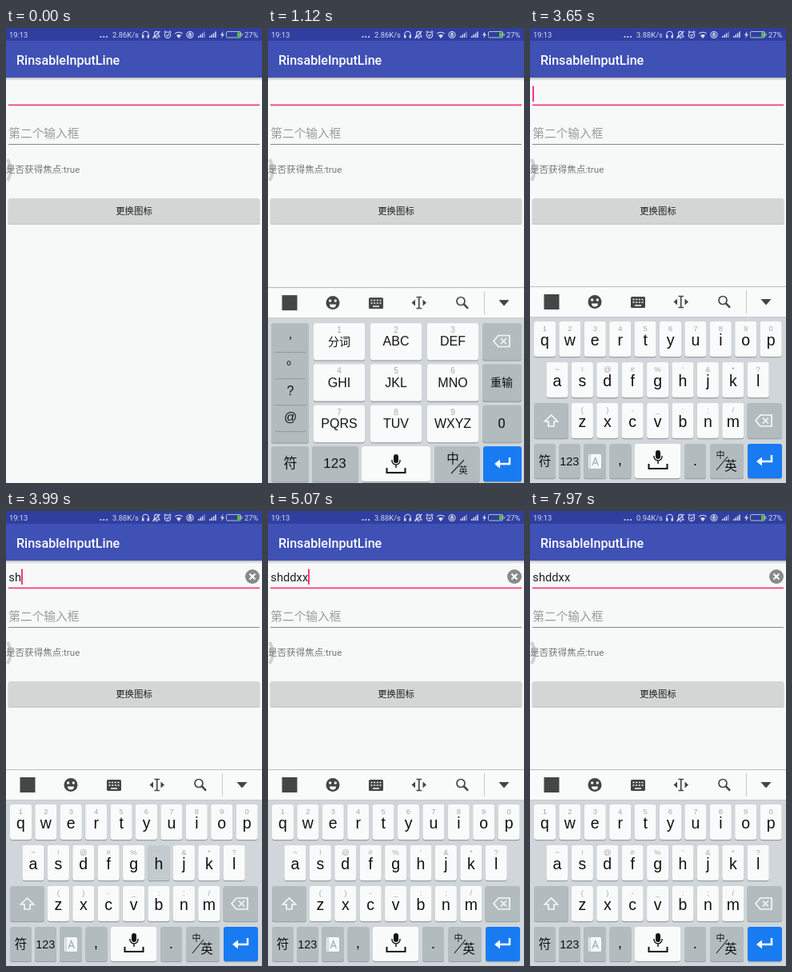
These frames come from a looping animation (320x569 px, 8 s). An HTML page:

```html
<!DOCTYPE html>
<html lang="zh-CN">
<head>
<meta charset="utf-8">
<title>Input demo</title>
<style>
html, body { margin: 0; width: 100%; height: 100%; overflow: hidden; background: #f7f9f8; }
svg { display: block; width: 100%; height: 100%; }
text { font-family: Roboto, "Noto Sans CJK SC", "Noto Sans CJK", sans-serif; white-space: pre; }
.key { font-family: "Liberation Sans", "Noto Sans CJK SC", "Noto Sans CJK", sans-serif; text-anchor: middle; fill: #111; }
.hint { fill: #a3a8a8; }
.word { font-weight: 500; }
.slim { font-family: Roboto, sans-serif; }
.status { font-size: 9.4px; fill: #d5daf1; }
.line { fill: none; stroke: #d5daf1; stroke-width: 1.1; }
.anim, .anim * { animation-duration: 8s; animation-iteration-count: infinite; animation-timing-function: step-end; }

#board { animation-name: rise; }
@keyframes rise {
  0% { transform: translateY(248px); }
  10.25% { transform: translateY(248px); animation-timing-function: cubic-bezier(.333, 1, .667, 1); }
  14.75%, 100% { transform: none; }
}
#nine { animation-name: nine; }
@keyframes nine { 0% { visibility: visible; } 40%, 100% { visibility: hidden; } }
#full { animation-name: full; }
@keyframes full { 0% { visibility: hidden; } 40%, 100% { visibility: visible; } }

#rate1 { animation-name: rate1; }
#rate2 { animation-name: rate2; }
#rate3 { animation-name: rate3; }
@keyframes rate1 { 0% { opacity: 1; } 18.75%, 100% { opacity: 0; } }
@keyframes rate2 { 0% { opacity: 0; } 18.75% { opacity: 1; } 70%, 100% { opacity: 0; } }
@keyframes rate3 { 0% { opacity: 0; } 70%, 100% { opacity: 1; } }

#caret { animation-name: blink; }
@keyframes blink {
  0%, 12.5%, 25%, 37.5%, 69%, 81.5%, 94%, 100% { opacity: 0; }
  6.25%, 18.75%, 31.25%, 43.75%, 60%, 75.25%, 87.75% { opacity: 1; }
}
#caret rect { animation-name: step; }
@keyframes step {
  0% { transform: none; }
  47% { transform: translateX(8px); }
  49.75% { transform: translateX(16px); }
  52% { transform: translateX(24px); }
  54.25% { transform: translateX(33px); }
  60% { transform: translateX(40px); }
  62.75%, 100% { transform: translateX(47px); }
}

#c1, #clear { animation-name: c1; }
#c2 { animation-name: c2; }
#c3 { animation-name: c3; }
#c4 { animation-name: c4; }
#c5 { animation-name: c5; }
#c6 { animation-name: c6; }
@keyframes c1 { 0% { visibility: hidden; } 47%, 100% { visibility: visible; } }
@keyframes c2 { 0% { visibility: hidden; } 49.75%, 100% { visibility: visible; } }
@keyframes c3 { 0% { visibility: hidden; } 52%, 100% { visibility: visible; } }
@keyframes c4 { 0% { visibility: hidden; } 54.25%, 100% { visibility: visible; } }
@keyframes c5 { 0% { visibility: hidden; } 60%, 100% { visibility: visible; } }
@keyframes c6 { 0% { visibility: hidden; } 62.75%, 100% { visibility: visible; } }

#key-s { animation-name: press-s; }
#key-h { animation-name: press-h; }
#key-d { animation-name: press-d; }
#key-x { animation-name: press-x; }
@keyframes press-s { 46.2% { fill: #c3cbce; } 0%, 47.4%, 100% { fill: #f9fbfa; } }
@keyframes press-h { 49% { fill: #c3cbce; } 0%, 50.2%, 100% { fill: #f9fbfa; } }
@keyframes press-d { 51.2%, 53.5% { fill: #c3cbce; } 0%, 52.4%, 54.7%, 100% { fill: #f9fbfa; } }
@keyframes press-x { 59.2%, 62% { fill: #c3cbce; } 0%, 60.4%, 63.2%, 100% { fill: #f9fbfa; } }
</style>
</head>
<body>
<svg viewBox="0 0 320 569" preserveAspectRatio="none">
  <defs>
    <linearGradient id="shade" x2="0" y2="1">
      <stop stop-color="#000" stop-opacity=".24"/>
      <stop offset="1" stop-color="#000" stop-opacity="0"/>
    </linearGradient>
  </defs>
  <rect width="320" height="569" fill="#f7f9f8"/>
  <rect y="16" width="320" height="46" fill="#3f51b5"/>
  <rect y="62" width="320" height="4" fill="url(#shade)"/>
  <rect width="320" height="16" fill="#303f9f"/>
  <text x="13" y="46" font-size="16.1" font-weight="500" fill="#fff">RinsableInputLine</text>

  <g class="anim">
    <text class="status" x="4" y="12">19:13</text>
    <text class="status" id="rate1" x="133" y="12">2.86K/s</text>
    <text class="status" id="rate2" x="133" y="12">3.88K/s</text>
    <text class="status" id="rate3" x="133" y="12">0.94K/s</text>
    <text class="status" x="298" y="12">27%</text>
    <g fill="#d5daf1">
      <circle cx="118.5" cy="11" r="1.1"/><circle cx="122.3" cy="11" r="1.1"/><circle cx="126.1" cy="11" r="1.1"/>
      <path d="M170 9h2.5v3.5H170zM176.500 9h2.500v3.500h-2.500zM271.500 4l-3.500 5h2.200l-1 4 3.800-5.300h-2.300z"/>
      <path d="M213 9.300a4.600 4.600 0 0 1 6 0l-3 3.700z"/>
      <path d="M240 12V10h1.500v2zM242.400 12V8.300h1.500V12zM244.800 12V6.500h1.500V12zM254 12V10h1.500v2zM256.400 12V8.300h1.500V12zM258.800 12V6.500h1.500V12zM261.200 12V4.500h1.500V12z"/>
      <path d="M247.200 12V4.500h1.500V12z" opacity=".5"/>
    </g>
    <g class="line">
      <path d="M170.700 11V8a3.800 3.800 0 0 1 7.600 0v3"/>
      <path d="M184.500 11h7.500l-1.200-1.700V7a2.600 2.600 0 0 0-5.200 0v2.300zM187 12.800h2.500M192.500 4l-9 9"/>
      <circle cx="202" cy="8.700" r="3.700"/><path d="M200.300 8.500l1.500 1.500 2.200-2.600M197.700 5.500l2-1.800M206.300 5.500l-2-1.800"/>
      <path d="M211.200 7.200a7 7 0 0 1 9.600 0"/>
      <circle cx="230" cy="8.500" r="4"/><rect x="228.600" y="8" width="2.800" height="2.300"/><path d="M229.100 8V7a.9.9 0 0 1 1.800 0v1"/>
    </g>
    <rect x="275.500" y="4.500" width="18" height="7.500" rx="1.500" fill="none" stroke="#a9c6bd"/>
    <path d="M295.200 6.800v3" stroke="#a9c6bd"/>
    <rect x="289" y="5.500" width="4" height="5.500" fill="#59bd45"/>

    <text y="88" x="3.300" font-size="14.700" fill="#202224"><tspan id="c1">s</tspan><tspan id="c2">h</tspan><tspan id="c3">d</tspan><tspan id="c4">d</tspan><tspan id="c5">x</tspan><tspan id="c6">x</tspan></text>
    <g id="caret"><rect x="3" y="72.500" width="2" height="19.500" fill="#f23c78"/></g>
    <g id="clear">
      <circle cx="308" cy="82" r="9" fill="#888a8a"/>
      <path d="M304.500 78.500l7 7M311.500 78.500l-7 7" stroke="#fff" stroke-width="2.200"/>
    </g>
  </g>

  <rect x="3" y="95.500" width="314" height="1.700" fill="#f23c78"/>
  <text x="3.300" y="137" font-size="14.700" fill="#999b9b">第二个输入框</text>
  <rect x="3" y="145" width="314" height="1" fill="#858988"/>
  <path d="M2 164Q9.500 178 2 191" fill="none" stroke="#d0d2d2" stroke-width="4"/>
  <text x="0" y="181" font-size="11.550" fill="#747676">是否获得焦点:true</text>
  <rect x="2.500" y="214" width="315" height="32" rx="2" fill="#000" opacity=".18"/>
  <rect x="3" y="213" width="314" height="31.500" rx="2" fill="#d4d6d5"/>
  <text x="160" y="233.200" font-size="11.400" font-weight="500" text-anchor="middle" fill="#212121">更换图标</text>

  <g class="anim"><g id="board">
    <rect y="323" width="320" height="250" fill="#d0d6d9"/>
    <rect y="323" width="320" height="38.500" fill="#f9fbfa"/>
    <path d="M0 323.500h320" stroke="#b9bdbe"/>
    <path d="M0 361.500h320" stroke="#c3c9cb"/>
    <path d="M270.500 328v29" stroke="#c6caca"/>
    <g fill="#434546">
      <rect x="17.500" y="333" width="19" height="19"/>
      <circle cx="81" cy="342.500" r="8.500"/>
      <rect x="126" y="336" width="18" height="14" rx="1.500"/>
      <path d="M184 338.500v8l-4.500-4zM193.500 338.500v8l4.500-4zM288.500 339h13l-6.500 7.500z"/>
    </g>
    <g fill="none" stroke="#434546" stroke-width="1.700">
      <path d="M185.500 335.500h6.500M185.500 349.500h6.500M188.750 335.500v14"/>
      <circle cx="241" cy="340.500" r="5"/><path d="M244.700 344.200l5.300 5.500" stroke-width="2.500"/>
    </g>
    <g fill="#f9fbfa">
      <circle cx="77.700" cy="340" r="1.700"/><circle cx="84.300" cy="340" r="1.700"/><path d="M77 344.500h8a4 4 0 0 1-8 0z"/>
    </g>
    <path d="M128.500 339.500h13M128.500 343h13" stroke="#f9fbfa" stroke-width="1.700" stroke-dasharray="2 1.660"/>
    <path d="M131 347h8" stroke="#f9fbfa" stroke-width="1.500"/>
    <g id="nine"></g>
    <g id="full"></g>
  </g></g>
</svg>
<script>
const WHITE = '#f9fbfa', GRAY = '#b2bcbf', BLUE = '#187bf2';

const key = (x, y, w, h, fill = WHITE, id = '') =>
  `<rect x="${x}" y="${y + 1.3}" width="${w}" height="${h}" rx="3" fill="#98a1a4"/>` +
  `<rect ${id && `id="key-${id}"`} x="${x}" y="${y}" width="${w}" height="${h}" rx="3" fill="${fill}"/>`;

const label = (s, x, y, size, extra = '') =>
  `<text class="key ${extra}" x="${x}" y="${y}" font-size="${size}">${s.replace('&', '&amp;')}</text>`;

const lines = (d, color, width = 1.8) =>
  `<path d="${d}" fill="none" stroke="${color}" stroke-width="${width}"/>`;

const erase = (x, y) => lines(
  `M${x - 10} ${y}l6-7h14v14h-14zM${x - 1} ${y - 3.5}l7 7M${x + 6} ${y - 3.5}l-7 7`, '#f5f8f8', 1.7);

const mic = (x, y) =>
  `<rect x="${x - 3}" y="${y - 11}" width="6" height="11" rx="3" fill="#111"/>` +
  lines(`M${x - 5} ${y - 4}v1a5 5 0 0 0 10 0v-1M${x} ${y + 2}v4`, '#111', 1.4) +
  lines(`M${x - 11.5} ${y + 6}v6h23v-6`, '#111', 2);

const enter = (x, y) =>
  lines(`M${x + 9} ${y - 7}v8h-15`, '#fff', 2.5) +
  `<path d="M${x - 10} ${y + 1}l7-5.500v11z" fill="#fff"/>`;

function ninePad() {
  const names = ['分词', 'ABC', 'DEF', 'GHI', 'JKL', 'MNO', 'PQRS', 'TUV', 'WXYZ'];
  let out = key(4, 368, 47, 149.5, GRAY);
  [',', '。', '?', '@'].forEach((s, i) => {
    out += label(s, i === 1 ? 31 : 28, [387, 419, 458, 491][i], 16);
    out += lines(`M9 ${404.5 + i * 33}h38`, '#8f999c', 1);
  });
  names.forEach((s, i) => {
    const x = 57 + i % 3 * 71, y = 368 + Math.floor(i / 3) * 51.3;
    out += key(x, y, 64, 46.3) + label(String(i + 1), x + 32, y + 12, 10, 'hint');
    out += label(s, x + 32, y + 28.3, i ? 16 : 14, i ? '' : 'word');
  });
  for (let i = 0; i < 3; i++) out += key(268, 368 + i * 51.3, 49, 46.3, GRAY);
  out += erase(292, 390.5) + label('重输', 292, 447, 14, 'word') + label('0', 292, 499, 17, 'slim');
  out += key(4, 522, 47, 44, GRAY) + label('符', 28, 549, 17);
  out += key(55, 522, 58, 44, GRAY) + label('123', 83.5, 549, 17);
  out += key(117, 522, 86, 44) + mic(160, 543);
  out += key(208, 522, 56.5, 44, GRAY) + label('中', 231, 543, 15.5) + label('英', 244, 556, 11);
  out += lines('M229 556l16-17', '#222', 1.1);
  return out + key(269, 522, 48, 44, BLUE) + enter(293, 543);
}

function fullPad() {
  const rows = [
    ['qwertyuiop', '1234567890', 18.5, 367],
    ['asdfghjkl', "~!@#%'&*?", 34, 418],
    ['zxcvbnm', '()-_:;/', 65.4, 469]
  ];
  let out = '';
  for (const [letters, marks, left, y] of rows) {
    [...letters].forEach((c, i) => {
      const x = left + i * 31.4;
      out += key(x - 13.5, y, 27, 44, WHITE, c);
      out += label(marks[i], x, y + 12, 9.5, 'hint') + label(c, x, y + 29.8, 19.5);
    });
  }
  out += key(5, 469, 43, 44, GRAY) + lines('M26.500 484l-8 8h4.500v6h7v-6h4.500z', '#f5f8f8', 1.7);
  out += key(271.5, 469, 43.5, 44, GRAY) + erase(292, 491);
  out += key(5, 520, 27, 43, GRAY) + label('符', 18.5, 547, 15.5);
  out += key(36, 520, 27, 43, GRAY) + label('123', 49.3, 547, 14.5);
  out += key(67, 520, 28, 43, GRAY);
  out += '<rect x="73" y="533" width="16" height="18" rx="1.500" fill="#f5f8f8"/>';
  out += lines('M75 533v18', GRAY, 1) + lines('M78 547l3.700-9.500 3.700 9.500M79.300 544h5', '#a5b0b3', 1.3);
  out += key(99.5, 520, 27, 43, GRAY) + label(',', 112.5, 546, 19);
  out += key(131, 520, 57, 43) + mic(160, 539);
  out += key(193, 520, 27, 43, GRAY) + label('.', 206.5, 547, 19);
  out += key(225, 520, 42, 43, GRAY) + label('中', 238, 538, 11) + label('英', 251, 553, 15.5);
  out += lines('M233 553l14-17', '#222', 1.1);
  return out + key(272, 520, 43, 43, BLUE) + enter(293, 541);
}

document.getElementById('nine').innerHTML = ninePad();
document.getElementById('full').innerHTML = fullPad();
</script>
</body>
</html>
```
